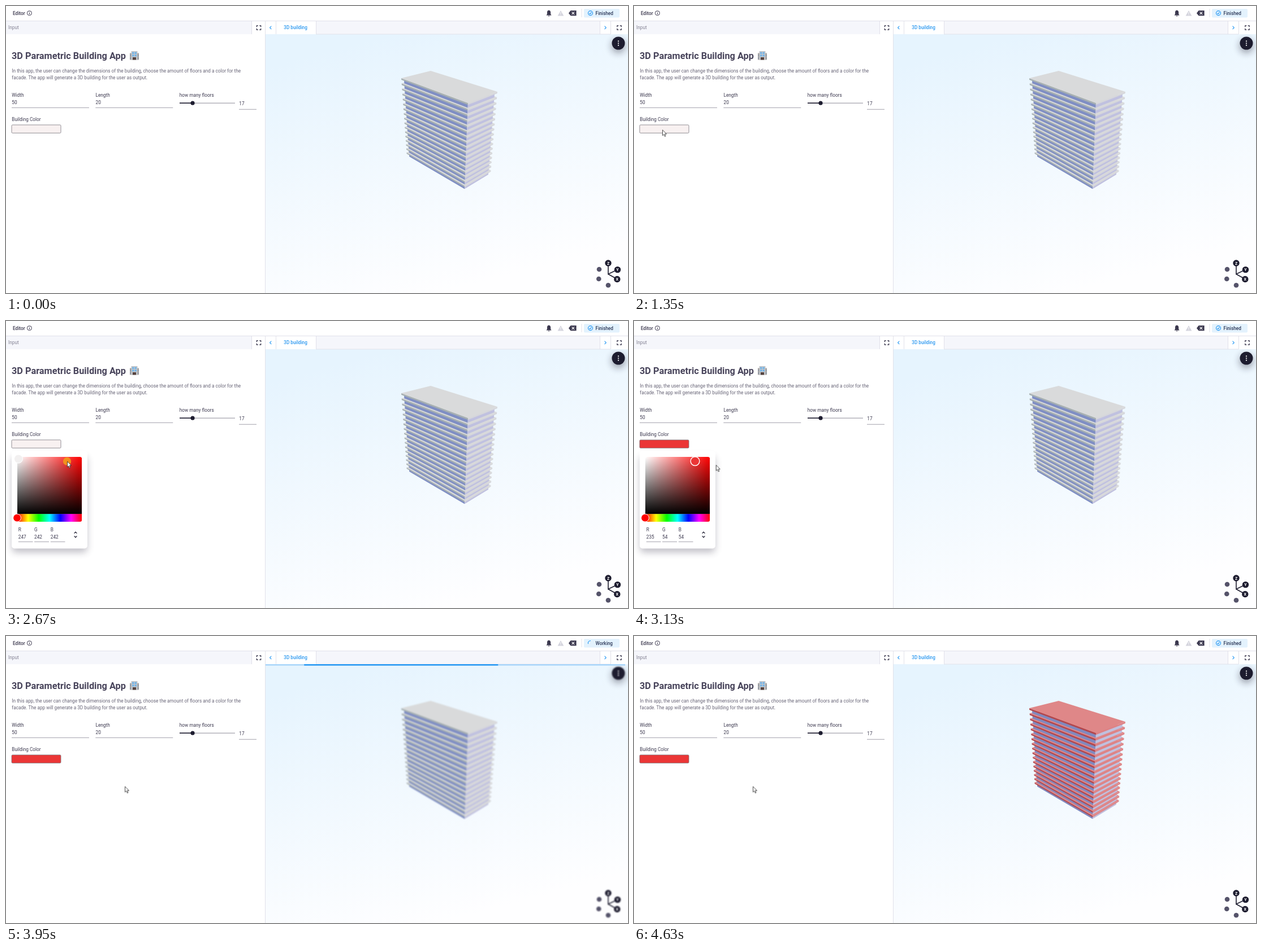
Recreate the animation shown at these times as an HTML page. Size 1100 by 509 pixels, loop 4.69 s.

```html
<!DOCTYPE html>
<html lang="en">
<head>
<meta charset="utf-8">
<title>Parametric building</title>
<style>
html, body { margin: 0; width: 100%; height: 100%; overflow: hidden; background: #fff; }
svg { display: block; width: 100vw; height: 100vh; font: 8.25px Roboto, sans-serif; fill: #3c394f; }
.m { font-weight: 500; }
.line { fill: none; stroke: #3c394f; stroke-width: 1; }
.rule { fill: none; stroke: #e1e1ea; }
.under { fill: none; stroke: #8d8b98; stroke-width: .8; }
.blue { fill: none; stroke: #2196f3; stroke-width: 1.1; }

.step, .move { animation: 4690ms infinite step-end; }
.move { animation-timing-function: linear; }
#swatch { animation-name: swatch; }
#popup { animation-name: popup; }
.before { animation-name: before; }
.after { animation-name: after; }
.idle { animation-name: idle; }
.busy { animation-name: busy; }
#bars { animation-name: bars; }
#bar { animation-name: bar; }
#scene { animation-name: blur; }
#plain { animation-name: plain; }
#red { animation-name: red; }
#cursor { animation-name: cursor; }
#click { animation-name: click; }
#spinBox { animation-name: spinBox; }
#spin { animation-name: spin; transform-origin: 1033.5px 12.5px; }

@keyframes swatch { 0% { fill: #f8f1f1; } 58.42%, 100% { fill: #eb3636; } }
@keyframes popup {
  0%, 30.27% { opacity: 0; }
  30.271%, 77.19% { opacity: 1; }
  81.45%, 100% { opacity: 0; }
}
@keyframes before { 0% { opacity: 1; } 58.42%, 100% { opacity: 0; } }
@keyframes after { 0% { opacity: 0; } 58.42%, 100% { opacity: 1; } }
@keyframes idle { 0% { opacity: 1; } 74.2% { opacity: 0; } 91.25%, 100% { opacity: 1; } }
@keyframes busy { 0% { opacity: 0; } 74.2% { opacity: 1; } 91.25%, 100% { opacity: 0; } }
@keyframes spinBox { 0% { opacity: 0; } 78.46% { opacity: 1; } 91.25%, 100% { opacity: 0; } }
@keyframes spin { from { transform: rotate(-76deg); } to { transform: rotate(1724deg); } }
@keyframes bars { 0% { opacity: 0; } 75.47% { opacity: 1; } 91.25%, 100% { opacity: 0; } }
@keyframes bar {
  0%, 75.47% { x: 459px; width: 12px; }
  76.97% { x: 459px; width: 59px; }
  82.5% { x: 459px; width: 328px; }
  84.22% { x: 526px; width: 343px; }
  88.49% { x: 755px; width: 340px; }
  91.25%, 100% { x: 930px; width: 165px; }
}
@keyframes blur {
  0%, 80.6% { filter: blur(0); }
  84%, 91.25% { filter: blur(1.05px); }
  94%, 100% { filter: blur(0); }
}
@keyframes plain { 0% { opacity: 1; } 91.25%, 100% { opacity: 0; } }
@keyframes red { 0% { opacity: 0; } 91.25%, 100% { opacity: 1; } }
@keyframes cursor {
  0%, 7.67% { transform: translate(1024px, 497px); opacity: 0; }
  7.671% { transform: translate(1024px, 497px); opacity: 1; animation-timing-function: cubic-bezier(.3, .1, .4, 1); }
  18.76% { transform: translate(49px, 252px); animation-timing-function: ease-out; }
  23%, 34.6% { transform: translate(50px, 219.5px); animation-timing-function: ease-in; }
  41.58% { transform: translate(85.7px, 266.6px); }
  46.06% { transform: translate(101px, 261px); animation-timing-function: ease-out; }
  51.4%, 62.5% { transform: translate(108px, 248.8px); animation-timing-function: ease-in-out; }
  72.7%, 100% { transform: translate(210px, 266.6px); opacity: 1; }
}
@keyframes click {
  0% { opacity: 0; }
  24.5% { opacity: .88; }
  27.5% { opacity: 0; }
  56.92% { opacity: .88; }
  59.7%, 100% { opacity: 0; }
}
</style>
</head>
<body>
<svg viewBox="0 0 1100 509" preserveAspectRatio="none">
  <defs>
    <linearGradient id="sky" gradientUnits="userSpaceOnUse" x1="720" y1="40" x2="840" y2="490">
      <stop stop-color="#e6f4fe"/><stop offset="1" stop-color="#fefeff"/>
    </linearGradient>
    <linearGradient id="sat"><stop stop-color="#fff"/><stop offset="1" stop-color="#f00"/></linearGradient>
    <linearGradient id="val" x2="0" y2="1"><stop stop-opacity="0"/><stop offset="1"/></linearGradient>
    <linearGradient id="hue">
      <stop stop-color="#f00"/><stop offset=".167" stop-color="#ff0"/><stop offset=".333" stop-color="#0f0"/>
      <stop offset=".5" stop-color="#0ff"/><stop offset=".667" stop-color="#00f"/>
      <stop offset=".833" stop-color="#f0f"/><stop offset="1" stop-color="#f00"/>
    </linearGradient>
    <filter id="soft" x="-100%" y="-100%" width="300%" height="300%"><feGaussianBlur stdDeviation="6.5"/></filter>
    <clipPath id="area"><rect x="20" y="241" width="114.2" height="115" rx="3.5"/></clipPath>
    <path id="expand" d="M-3.7-1.2V-3.7H-1.2M1.2-3.7H3.7V-1.2M3.7 1.2V3.7H1.2M-1.2 3.7H-3.7V1.2"
      fill="none" stroke="#2b2840" stroke-width="1.2"/>
  </defs>

  <rect width="1100" height="509" fill="#fff"/>

  <!-- viewer -->
  <rect x="459" y="50" width="641" height="459" fill="url(#sky)"/>
  <g id="scene" class="move">
    <g id="plain" class="step"></g>
    <g id="red" class="step"></g>
    <circle cx="1083" cy="71" r="12" fill="#1d1c2f" opacity=".42" filter="url(#soft)"/>
    <circle cx="1083" cy="66" r="11.5" fill="#1d1c2f"/>
    <g fill="#fff"><circle cx="1083" cy="62.3" r="1.1"/><circle cx="1083" cy="66" r="1.1"/><circle cx="1083" cy="69.7" r="1.1"/></g>
    <g fill="#55536a"><circle cx="1049" cy="467" r="4.3"/><circle cx="1048.3" cy="484" r="4.3"/><circle cx="1065" cy="495.3" r="4.3"/></g>
    <path d="M1065 456V475.5L1081.5 467.5M1065 475.5L1081 484.5" fill="none" stroke="#1d1c2f" stroke-width="1.6"/>
    <g fill="#1d1c2f"><circle cx="1065" cy="456" r="5.7"/><circle cx="1081.5" cy="467.6" r="5.7"/><circle cx="1080.8" cy="484.5" r="5.7"/></g>
    <g fill="#fff" font-size="7" font-weight="700" text-anchor="middle">
      <text x="1065" y="458.6">Z</text><text x="1081.5" y="470.2">Y</text><text x="1080.8" y="487.1">X</text>
    </g>
  </g>

  <!-- top bar -->
  <rect width="1100" height="50" fill="#fff"/>
  <text class="m" x="12" y="15.5">Editor</text>
  <circle class="line" cx="41.4" cy="12.6" r="4"/>
  <path class="line" d="M41.4 12V15M41.4 10.2V11.2"/>
  <path d="M960 7.6C957.4 8 957 10 957 12V14.6L955.8 16V16.6H964.4V16L963.2 14.6V12C963.2 10 962.6 8 960 7.6ZM958.9 17.2H961.3A1.2 1.2 0 0 1 958.9 17.2Z"/>
  <path d="M981 8L986.4 17.4H975.6Z" fill="#d4d4dd"/>
  <path d="M981 11V14M981 14.9V16" stroke="#fff"/>
  <path d="M998.6 8H1008.6V17.3H998.6L995 12.65Z"/>
  <path d="M1000.6 10.4L1005.2 15M1005.2 10.4L1000.6 15" stroke="#fff" stroke-width="1.1"/>
  <path class="rule" d="M1018 5V20"/>
  <rect x="1022" y="5" width="63" height="15.5" rx="2" fill="#e3f2fd"/>
  <g class="m" fill="#2b3757">
    <g class="step idle">
      <circle class="blue" cx="1033.5" cy="12.6" r="4"/>
      <path class="blue" d="M1031.5 12.7L1032.9 14.1L1035.6 11.2"/>
      <text x="1042.6" y="15.5">Finished</text>
    </g>
    <g class="step busy"><text x="1042.6" y="15.5">Working</text></g>
  </g>
  <g id="spinBox" class="step"><path id="spin" class="blue move" d="M1029.7 14A4 4 0 0 1 1034 8.5"/></g>

  <!-- panel headers -->
  <path d="M0 27H434V50H0ZM548 27H1050V50H548Z" fill="#f5f6fb"/>
  <path class="rule" d="M0 26.5H1100M434.5 27V50M458.5 27V509M477.5 27V50M548.5 27V50M1050.5 27V50M1069.5 27V50M548 50H1069"/>
  <text x="4" y="41.4" fill="#858394">Input</text>
  <use href="#expand" x="447" y="38.5"/>
  <use href="#expand" x="1084.5" y="38.5"/>
  <path class="blue" d="M469.3 35.6L466.6 38.4L469.3 41.2M1058.6 35.6L1061.3 38.4L1058.6 41.2"/>
  <text class="m" x="491.2" y="41.3" fill="#2b98f0">3D building</text>
  <g id="bars" class="step">
    <rect x="459" y="50" width="636" height="2.4" fill="#a6d4fa"/>
    <rect id="bar" class="move" x="459" y="50" width="59" height="2.4" fill="#2196f3"/>
  </g>

  <!-- form -->
  <text x="10" y="93.9" font-size="16.3" font-weight="700" fill="#47435a">3D Parametric Building App</text>
  <g>
    <path d="M219 83.5H235V95.5H219Z" fill="#a9a5a4"/>
    <path d="M221.5 80H232.5V95.5H221.5Z" fill="#c3c6ca"/>
    <path d="M223.2 81.8H226.3V85H223.2ZM227.7 81.8H230.8V85H227.7ZM223.2 86.2H226.3V89.4H223.2ZM227.7 86.2H230.8V89.4H227.7Z" fill="#6fb4ea"/>
    <path d="M219.6 86H220.8V89H219.6ZM233.2 86H234.4V89H233.2ZM219.6 91H220.8V94H219.6ZM233.2 91H234.4V94H233.2Z" fill="#8193a5"/>
    <path d="M224 91H230V95.5H224Z" fill="#57443f"/>
  </g>
  <g fill="#686577">
    <text x="10.3" y="117.8">In this app, the user can change the dimensions of the building, choose the amount of floors and a color for the</text>
    <text x="10.3" y="130">facade. The app will generate a 3D building for the user as output.</text>
  </g>
  <text x="10.3" y="160.5">Width</text><text x="10.3" y="174.4">50</text>
  <text x="158.5" y="160.5">Length</text><text x="158.5" y="174.4">20</text>
  <text x="306.8" y="160.5">how many floors</text><text x="412.3" y="176.2">17</text>
  <path class="under" d="M10 180.4H147M158.3 180.4H295.3M412 183.3H443"/>
  <path d="M307 172.2H405" stroke="#8d8b98"/>
  <path d="M307 172.2H330" stroke="#1d1c2f" stroke-width="1.6"/>
  <circle cx="330" cy="172.2" r="3.6" fill="#1d1c2f"/>
  <text x="10.3" y="203.5">Building Color</text>
  <rect id="swatch" class="step" x="10" y="210.9" width="87" height="14.4" rx="1.5" stroke="#77747c" stroke-width=".8"/>

  <!-- colour picker -->
  <g id="popup" class="move">
    <rect x="11" y="241" width="132" height="169" rx="5" fill="#2b2840" opacity=".3" filter="url(#soft)"/>
    <rect x="10" y="230" width="134" height="173.5" rx="5" fill="#fff"/>
    <g clip-path="url(#area)">
      <rect x="20" y="241" width="114.2" height="101.5" fill="url(#sat)"/>
      <rect x="20" y="241" width="114.2" height="101.5" fill="url(#val)"/>
      <rect x="20" y="342.3" width="114.2" height="14" fill="url(#hue)"/>
    </g>
    <circle class="step before" cx="22" cy="244.5" r="7.5" fill="#f2f0f0" stroke="#fff"/>
    <circle class="step after" cx="108" cy="248.6" r="7.9" fill="#eb3636" stroke="#fff" stroke-width="1.4"/>
    <circle cx="19.6" cy="349.2" r="6.9" fill="#f00" stroke="#fff"/>
    <text x="21.8" y="373.3">R</text><text x="50" y="373.3">G</text><text x="78.8" y="373.3">B</text>
    <g class="step before"><text x="21.8" y="386.2">247</text><text x="50" y="386.2">242</text><text x="78.8" y="386.2">242</text></g>
    <g class="step after"><text x="21.8" y="386.2">235</text><text x="50" y="386.2">54</text><text x="78.8" y="386.2">54</text></g>
    <path class="under" d="M21.8 391.6H47.5M50 391.6H76M78.8 391.6H104.5"/>
    <path d="M120.6 376.6L123 374.2L125.4 376.6M120.6 381.4L123 383.8L125.4 381.4" fill="none" stroke="#1d1c2f" stroke-width="1.3"/>
  </g>

  <g id="cursor" class="move">
    <circle id="click" class="step" r="7.2" fill="#f39c1a"/>
    <path d="M.5.3V10.2L2.8 8.2L4.4 11.9L6 11.2L4.4 7.6H7.6Z" fill="#fff" stroke="#222" stroke-width=".8" stroke-linejoin="round"/>
  </g>
</svg>
<script>
const FLOORS = 17, SLAB = 0.31, DEPTH = 1.15;
const EDGES = {
  left: [699, 128, 709, 267],
  front: [817, 172, 811, 327],
  right: [869, 152, 857, 299],
  back: [751, 115, 755, 243]
};

// Point on a vertical edge, t = 0 at the roof and 1 at the ground, with perspective.
function onEdge(name, t) {
  const [x0, y0, x1, y1] = EDGES[name];
  const s = t * DEPTH / (1 - t + t * DEPTH);
  return [x0 + (x1 - x0) * s, y0 + (y1 - y0) * s];
}

// Outline at one level; walls are set back by a share of each side.
function level(floor, a = 0, b = 0) {
  const [L, F, R, B] = ['left', 'front', 'right', 'back'].map(n => onEdge(n, floor / FLOORS));
  const mix = (p, u, v) => p.map((c, i) => c + a * u * (L[i] - F[i]) + b * v * (R[i] - F[i]));
  return { L: mix(L, -1, 1), F: mix(F, 1, 1), R: mix(R, 1, -1), B };
}

function build(id, color) {
  let out = '';
  const poly = (fill, ...pts) => {
    out += `<path fill="${fill}" d="M${pts.map(p => p.map(c => c.toFixed(2)).join(' ')).join('L')}Z"/>`;
  };
  const block = (hi, lo, left, right) => {
    poly(left, hi.L, hi.F, lo.F, lo.L);
    poly(right, hi.F, hi.R, lo.R, lo.F);
  };
  for (let i = FLOORS - 1; i >= 0; i--) {
    block(level(i + SLAB, .02, .045), level(i + 1, .02, .045), color.glass, color.wall);
    const top = level(i);
    block(top, level(i + SLAB), color.shade, color.light);
    poly(color.top, top.L, top.F, top.R, top.B);
  }
  document.getElementById(id).innerHTML = out;
}

build('plain', { top: '#d9dadb', shade: '#a7b0b2', light: '#d6d7db', glass: '#7f8ec4', wall: '#c0c1e0' });
build('red', { top: '#df8788', shade: '#b2484e', light: '#de8285', glass: '#8089bf', wall: '#c0c0de' });
</script>
</body>
</html>
```
